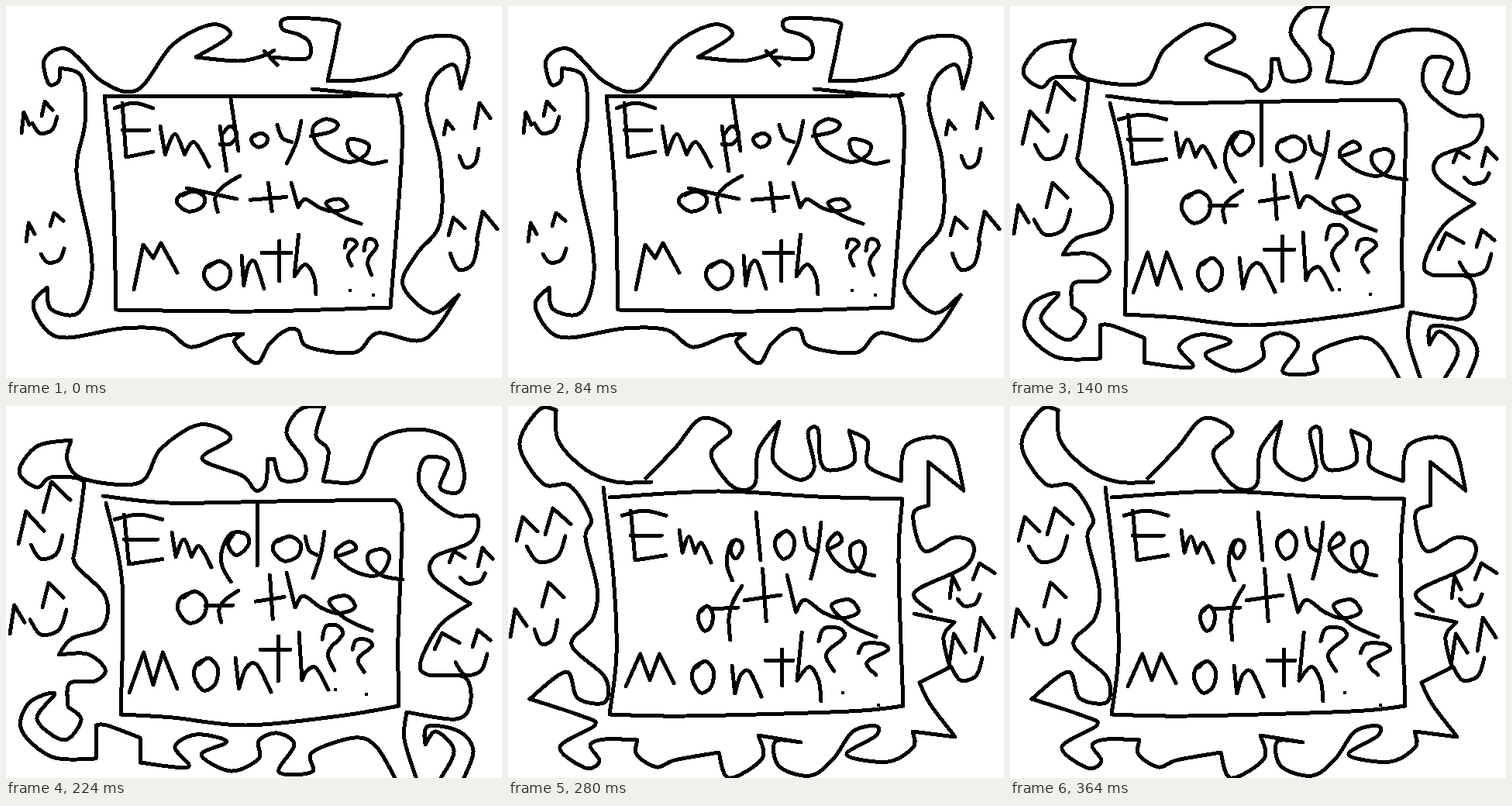
An HTML page that plays this animation: 640x480 px, repeating every 420 ms.

```html
<!DOCTYPE html>
<html lang="en">
<meta charset="utf-8">
<title>Employee of the Month??</title>
<style>
  html, body { margin: 0; height: 100%; overflow: hidden; background: #fff; }
  svg { display: block; width: 640px; height: 480px; }
  path { fill: none; stroke: #000; stroke-width: 5; stroke-linecap: round; stroke-linejoin: round; }
</style>
<svg viewBox="0 0 640 480" shape-rendering="crispEdges"><path id="ink"/></svg>
<script>
// Handwriting on a 10 by 10 grid: points joined smoothly, "!" is a sharp corner, "|" lifts the pen.
const glyphs = {
  E: '0,1 5,0 10,1|2,0 3,10|2,5 9,5|3,10 10,9',
  m: '0,0 1,7! 3,2 5,7! 7,4 10,10',
  P: '0,0 4,10|1,2 6,0 10,2 6,4 0,4',
  p: '4,10 1,7 1,4 4,1 9,1 10,3 6,5 3,3 5,1',
  o: '6,0 1,2 0,6 4,10 9,8 10,3 6,0 2,2',
  y: '0,1 2,4 6,5|10,0 8,5 4,10',
  ee: '0,4 3,2 2,0 0,3 2,7 5,9 7,8 8,4 7,2 5,3 5,6 7,9 10,10',
  f: '10,0 3,3 0,6 1,10',
  t: '5,0 6,10|0,6 10,5',
  he: '0,0 1,6! 2,4 4,6 6,7 8,6 7,4 5,5 7,8 10,10',
  M: '0,10 3,0! 5,8! 7,0! 10,9',
  n: '0,0 1,9! 3,3 6,2 10,10',
  T: '6,0 6,10|0,3 10,3',
  h: '2,0 0,7! 5,5 9,7 10,10',
  '?': '0,3 2,0 8,0 10,2 4,5 3,7 6,10',
  line: '0,0 10,10',
  eye: '0,10 3,0! 10,6',
  smile: '0,4 3,10 8,8 10,0'
};

let d;

function stroke(points, x = 0, y = 0, w = 10, h = 10) {
  const pts = points.split(' ').flatMap(s => {
    const [u, v] = s.replace('!', '').split(',');
    const p = [x + u * w / 10, y + v * h / 10];
    return s.endsWith('!') ? [p, p] : [p];
  });
  const at = i => pts[Math.max(0, Math.min(pts.length - 1, i))];
  // The tiny first step lets a single point show as a dot.
  d += `M${pts[0]}h.01`;
  for (let i = 0; i < pts.length - 1; i++) {
    const [a, b, c, e] = [at(i - 1), at(i), at(i + 1), at(i + 2)];
    if (b === c) continue;
    const out = b.map((v, k) => v + (c[k] - a[k]) / 6);
    const into = c.map((v, k) => v - (e[k] - b[k]) / 6);
    d += `C${out} ${into} ${c}`;
  }
}

const put = (name, ...box) => glyphs[name].split('|').forEach(s => stroke(s, ...box));

function face(left, right, mouth) {
  put('eye', ...left);
  put('eye', ...right);
  put('smile', ...mouth);
}

function calm() {
  stroke('415,97! 427,38 424,20 362,16 357,30 378,37 392,48 388,68 345,66');
  stroke('333,58 350,76');
  stroke('346,57 333,64 300,71 245,66! 289,38 265,24 215,50 170,108 125,98 80,56 50,68 55,100 68,97 70,80');
  stroke('70,80 98,92 102,150 91,215 109,310 109,360 92,397 58,391 53,363! 35,385 52,418 80,428 150,416 205,418 238,440 280,426 306,423!');
  stroke('306,423 295,435 323,461 340,436 362,418 377,419 390,440 450,447 480,422 540,430 584,373');
  stroke('584,373! 550,396 512,360 530,320 560,280 560,200 543,130 553,92 578,76 587,107! 597,65 580,40 530,45 500,82 460,95 415,97');

  stroke('127,116 138,240 142,392! 320,394 496,389! 511,185 505,120 490,116 300,117 127,116');
  stroke('395,107 485,116');

  put('E', 140, 125, 50, 70);
  put('m', 199, 155, 63, 52);
  put('P', 276, 155, 22, 58);
  put('line', 290, 120, 10, 67);
  put('o', 317, 164, 20, 18);
  put('y', 350, 148, 31, 55);
  stroke('393,168 420,162 428,152 412,146 396,158 405,183 440,201 463,193 467,178 443,172 445,190 470,203 491,200');

  put('o', 221, 239, 35, 26);
  put('f', 270, 219, 32, 47);
  put('line', 233, 235, 65, 14);
  put('t', 315, 228, 47, 37);
  put('he', 368, 228, 90, 53);

  stroke('165,366 177,308! 190,325! 200,306! 221,344');
  put('o', 256, 329, 33, 36);
  put('n', 304, 322, 29, 43);
  put('T', 330, 303, 38, 52);
  put('h', 372, 295, 28, 77);
  put('?', 437, 302, 15, 33);
  put('?', 462, 302, 16, 45);
  stroke('444,367');
  stroke('474,373');

  face([20, 137, 10, 27], [46, 123, 14, 19], [34, 143, 32, 21]);
  face([26, 280, 11, 24], [57, 267, 17, 17], [45, 313, 30, 18]);
  face([565, 148, 12, 18], [605, 125, 20, 33], [585, 184, 25, 24]);
  face([571, 273, 21, 23], [607, 265, 27, 38], [573, 305, 36, 35]);
}

function curly() {
  stroke('84,44! 79,70 100,94 172,99 200,55 250,24 290,41 253,68 305,90 322,109 335,100 338,68! 346,68! 355,95 383,93 385,70 362,35 380,4 411,0! 400,38 416,58 409,97!');
  stroke('409,97 455,95 480,45 530,30 575,45 591,85 584,111 560,105 570,72 540,68 535,105 575,140 608,143 600,175 553,195 552,222 599,255');
  stroke('599,255 560,283 535,330 545,347 592,350 599,385 580,404 517,395! 514,430 530,482');
  stroke('541,437 555,420 578,445 560,482');
  stroke('540,434 545,413 585,420 603,445 590,482');
  stroke('503,482 478,440 450,428 395,447 395,472 352,472 372,437 350,422 326,432 326,455 290,471 252,450 285,433 245,424 218,440 235,466 173,460! 173,428! 130,412 116,412! 116,455!');
  stroke('116,455 60,453 20,418 30,383 63,371 40,404 75,431 97,405 80,388! 82,358 115,355 128,340 105,320 68,321!');
  stroke('68,321 85,300 125,285 128,245 90,205 90,180 99,115 97,95 58,92 40,105 17,85 40,52 84,44');

  stroke('129,125 150,230 148,398! 215,402 310,412 430,400 507,387! 506,300 511,150 501,121! 350,123 210,125 125,116');

  put('E', 140, 140, 62, 64);
  put('m', 214, 163, 51, 45);
  put('p', 275, 158, 38, 69);
  put('line', 324, 125, 0, 81);
  put('o', 345, 168, 35, 32);
  put('y', 386, 162, 25, 60);
  put('ee', 425, 175, 87, 49);

  put('o', 222, 239, 36, 41);
  put('f', 275, 238, 25, 41);
  put('line', 257, 258, 36, -1);
  put('t', 322, 218, 37, 57);
  put('he', 362, 215, 110, 75);

  put('M', 159, 318, 62, 52);
  put('o', 243, 325, 30, 42);
  put('n', 296, 325, 46, 44);
  put('T', 328, 297, 39, 58);
  stroke('378,292 382,354! 388,342 400,338 416,366');
  put('?', 408, 284, 26, 57);
  put('?', 447, 302, 25, 41);
  stroke('425,366');
  stroke('465,372');

  face([16, 136, 33, 42], [48, 98, 35, 39], [32, 167, 41, 30]);
  face([5, 257, 19, 37], [47, 228, 27, 32], [31, 263, 47, 32]);
  face([572, 187, 20, 15], [609, 183, 19, 24], [586, 216, 32, 13]);
  face([553, 293, 32, 21], [602, 289, 23, 22], [580, 320, 41, 27]);
}

function spiky() {
  stroke('62,5 65,45 100,82 140,98 185,98');
  stroke('507,97! 465,78 464,45 440,32! 447,72 415,83 403,70 400,30 387,35 395,80 375,95 342,70 350,20! 323,57 318,102 290,104 262,62 287,33 250,16 215,55 178,93');
  stroke('62,5 40,5 15,50 45,100 80,103 107,145 100,170 115,235 109,275 82,308 125,350 125,382 90,377 75,343 28,378!');
  stroke('28,378 95,400 112,412 67,440 100,467 118,458 106,438 125,430 167,431! 166,450 192,466 215,457 272,447! 285,480 328,455 323,425! 378,434');
  stroke('378,434 345,433 350,465 390,477 420,455 445,420 475,413 474,426 437,450 490,459 523,440 522,420! 577,427! 545,385 531,357! 570,337! 562,298 576,279! 524,268');
  stroke('546,265 525,240 590,207 600,178 575,170 537,187 523,140 543,128! 542,72! 588,109! 568,45 515,50 507,97');

  stroke('123,105 136,220 140,320 131,398! 230,400 440,394 510,387! 504,200 509,120! 400,117 270,110 131,118');

  put('E', 147, 135, 57, 64);
  put('m', 221, 160, 41, 42);
  put('p', 281, 169, 21, 56);
  put('line', 320, 137, 6, 62);
  put('o', 345, 161, 24, 36);
  put('y', 382, 150, 22, 73);
  put('ee', 412, 164, 61, 55);

  put('o', 246, 258, 18, 32);
  put('f', 285, 232, 17, 70);
  put('line', 262, 262, 35, -2);
  put('t', 305, 210, 47, 68);
  put('he', 360, 218, 115, 80);

  put('M', 152, 320, 62, 42);
  put('o', 238, 329, 27, 41);
  put('n', 289, 335, 38, 40);
  put('T', 332, 314, 36, 47);
  put('h', 373, 292, 31, 89);
  put('?', 401, 287, 33, 55);
  put('?', 452, 307, 38, 40);
  stroke('432,370');
  stroke('478,386');

  face([11, 143, 27, 31], [48, 132, 33, 34], [24, 168, 50, 33]);
  face([3, 262, 21, 36], [44, 228, 28, 31], [34, 276, 30, 31]);
  face([570, 220, 12, 28], [600, 203, 28, 21], [580, 243, 29, 15]);
  face([569, 294, 21, 40], [603, 273, 24, 43], [572, 325, 40, 29]);
}

const poses = [calm, curly, spiky].map(pose => {
  d = '';
  pose();
  return d;
});
const ink = document.getElementById('ink');
const start = performance.now();

function draw() {
  const time = performance.now() - start;
  ink.setAttribute('d', poses[Math.floor(time / 140) % poses.length]);
  requestAnimationFrame(draw);
}
draw();
</script>
</html>
```
